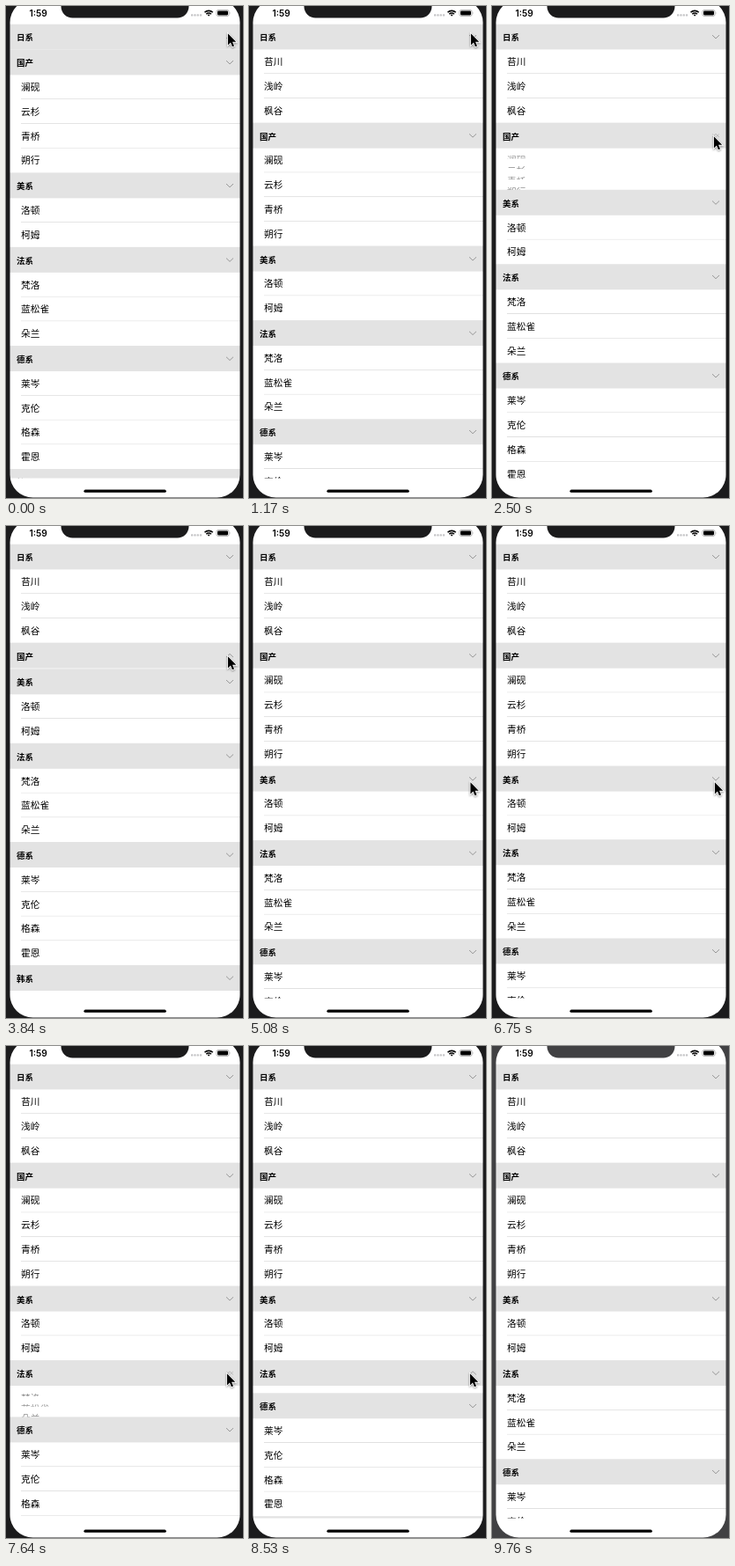
Write an HTML page that moves like this. It is 269 px wide and 559 px high and loops after 9.86 s.

```html
<!DOCTYPE html>
<html lang="zh">
<head>
<meta charset="utf-8">
<style>
html, body { margin: 0; height: 100%; overflow: hidden; background: #fff; }
svg { display: block; width: 269px; height: 559px; }
text { font-family: "Noto Sans CJK SC", "Noto Sans CJK", sans-serif; font-size: 10.7px; }
.head { font-size: 9.5px; font-weight: 700; }
.clock { font: 600 10.2px Inter, sans-serif; }
.chevron { fill: none; stroke: #858585; stroke-width: .8; }
</style>
</head>
<body>
<svg viewBox="0 0 269 559">
  <clipPath id="view"><rect x="4" y="20.4" width="262" height="516"/></clipPath>
  <rect width="269" height="559" fill="#fff"/>
  <g id="table" clip-path="url(#view)"></g>
  <text class="clock" x="26.5" y="12">1:59</text>
  <g fill="#c4c4c6">
    <rect x="210" y="9.3" width="2.3" height="2.3" rx=".7"/>
    <rect x="213.3" y="9.3" width="2.3" height="2.3" rx=".7"/>
    <rect x="216.6" y="9.3" width="2.3" height="2.3" rx=".7"/>
    <rect x="219.9" y="9.3" width="2.3" height="2.3" rx=".7"/>
  </g>
  <g fill="none" stroke="#000" stroke-width="1.6">
    <path d="M225.5 7.2a6.6 6.6 0 0 1 9.2 0M227.3 9.2a4 4 0 0 1 5.6 0"/>
    <path d="M228.7 10.1L230.1 11.8L231.5 10.1A2 2 0 0 0 228.7 10.1Z" fill="#000" stroke="none"/>
  </g>
  <rect x="238.9" y="4.5" width="14.2" height="7" rx="2" fill="none" stroke="#999" stroke-width=".7"/>
  <rect x="240" y="5.6" width="12" height="4.8" rx="1.1"/>
  <path d="M253.9 6.7q1.2 1.3 0 2.6z" fill="#999"/>
  <rect x="88.4" y="549.5" width="93.4" height="3.3" rx="1.65"/>
  <path id="bezel" fill-rule="evenodd" d="M0-10H269V562H0Z
    M30.5-7.3H239.5a26 26 0 0 1 26 26V532.5a26 26 0 0 1-26 26H30.5a26 26 0 0 1-26-26V18.7a26 26 0 0 1 26-26Z
    M62.5-7.3V.5a13 13 0 0 0 13 13H194.5a13 13 0 0 0 13-13V-7.3Z"/>
  <path id="cursor" d="M.9 1.3V14.4l3-2.8 2 4.6 2.1-.9-2-4.5h4.2z" stroke="#fff" stroke-width="1.7"
    paint-order="stroke" style="filter: drop-shadow(0 1px 1px #0006)"/>
</svg>
<script>
const LOOP = 9860, TICK = 88.6, FIRST = 895;
const TOP = 20.4, HEAD = 29, ROW = 27.74;
const groups = [
  ['日系', '苔川', '浅岭', '枫谷'],
  ['国产', '澜砚', '云杉', '青桥', '朔行'],
  ['美系', '洛顿', '柯姆'],
  ['法系', '梵洛', '蓝松雀', '朵兰'],
  ['德系', '莱岑', '克伦', '格森', '霍恩'],
  ['韩系']
];
// [section, tick at which it starts to open or close]
const toggles = [[0, -.5], [1, 16.5], [1, 32.67], [2, 51.5], [2, 63.59], [3, 74.5], [3, 85.17]];
// [tick, x, y]
const path = [[5, 251, 30], [14, 251, 147], [35, 251, 147], [44, 249, 290], [50, 252, 290],
  [67, 252, 290], [72, 250, 371], [89, 250, 371], [97, 254, 566]];

const $ = id => document.getElementById(id);
const clamp = u => Math.max(0, Math.min(1, u));
const ease = u => u < .5 ? 4 * u ** 3 : 1 - 4 * (1 - u) ** 3;
const smooth = u => u * u * (3 - 2 * u);
const move = (el, x, y) => el.setAttribute('transform', `translate(${x} ${y})`);

const rowMarkup = (name, i, rows) => `<g class="row">
  <rect x="4" width="262" height="${ROW}" fill="#fff"/>
  <text x="17" y="17.8">${name}</text>
  ${i < rows.length - 1 ? `<rect x="17" y="${ROW - .6}" width="249" height=".6" fill="#ccc"/>` : ''}</g>`;

$('table').innerHTML = groups.map(([title, ...rows]) => `<g class="section">
  <g class="rows">${rows.map(rowMarkup).join('')}</g>
  <rect x="4" width="262" height="${HEAD}" fill="#e3e3e3"/>
  <text class="head" x="12" y="19">${title}</text>
  <path class="chevron" d="M250 12.7l4 3.8 4-3.8"/>
  <path class="chevron" d="M250 16.5l4-3.8 4 3.8"/></g>`).join('');

const sections = [...document.querySelectorAll('.section')].map(el => ({
  el,
  list: el.querySelector('.rows'),
  rows: [...el.querySelectorAll('.row')],
  chevrons: el.querySelectorAll('.chevron')
}));

function layout(tick) {
  const open = groups.map((_, i) => i ? 1 : 0);
  for (const [i, start] of toggles)
    open[i] += (1 - 2 * open[i]) * ease(clamp((tick - start) / 2.85));
  let y = TOP;
  sections.forEach(({ el, list, rows, chevrons }, i) => {
    const p = open[i];
    move(el, 0, y);
    list.setAttribute('opacity', p);
    rows.forEach((row, j) => move(row, 0, HEAD + j * ROW * p));
    chevrons[0].setAttribute('opacity', p);
    chevrons[1].setAttribute('opacity', 1 - p);
    y += HEAD + rows.length * ROW * p;
  });
}

function pointer(tick) {
  let [, x, y] = path[0];
  for (let i = 1; i < path.length; i++) {
    const [a, x0, y0] = path[i - 1], [b, x1, y1] = path[i];
    if (tick < a) break;
    const u = smooth(clamp((tick - a) / (b - a)));
    x = x0 + (x1 - x0) * u;
    y = y0 + (y1 - y0) * u;
  }
  move($('cursor'), x, y);
}

const begin = performance.now();
function draw() {
  const time = (performance.now() - begin) % LOOP;
  const tick = Math.floor((time - FIRST) / TICK);
  layout(tick);
  pointer(tick);
  $('bezel').setAttribute('fill', tick >= 100 ? '#414143' : '#1b1b1c');
  requestAnimationFrame(draw);
}
draw();
</script>
</body>
</html>
```
